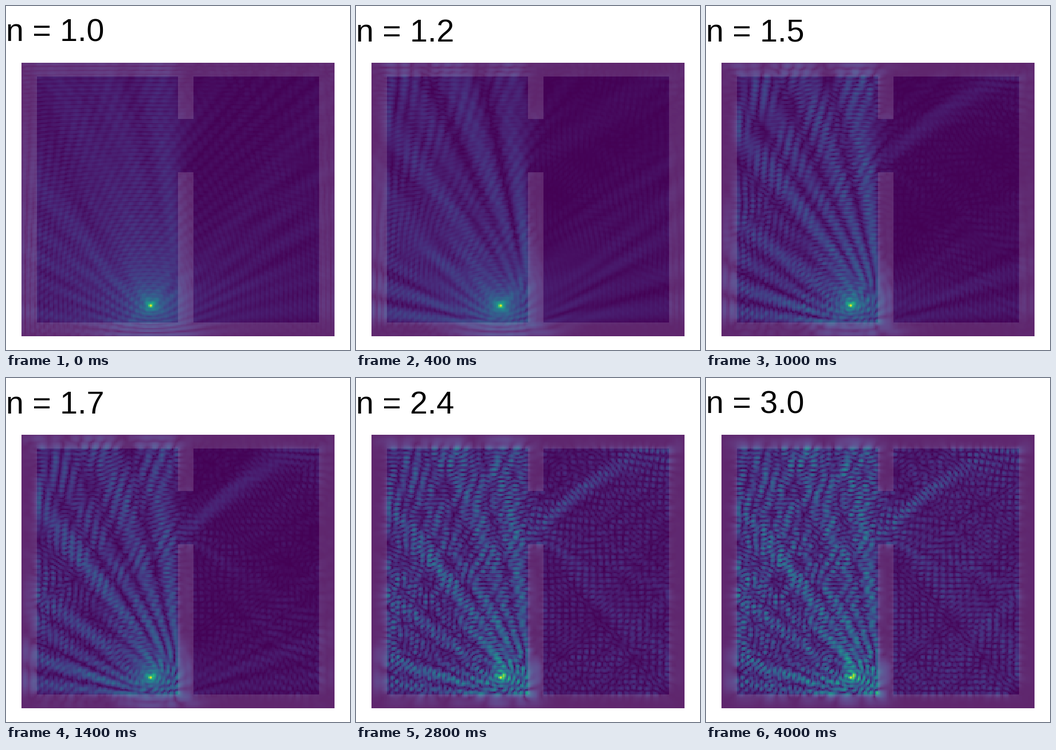
A matplotlib script for the animation above (4200 ms loop, 600 by 600 pixels).

```python
import matplotlib.pyplot as plt
import numpy as np
from matplotlib.animation import FuncAnimation
from numpy.linalg import eig, inv, solve

N = 200                      # grid cells per side
WALL = 10                    # wall thickness in cells
LEFT, RIGHT = 90, 80         # widths of the two rooms
SRC_X, SRC_Y = 82, 22
GAP = slice(120, 159)        # doorway rows in the middle wall
FRAMES, INTERVAL = 21, 200
C_AIR = 1.0                  # (wavenumber * cell size) squared
LOSS = 0.1                   # absorption inside the walls
EYE = np.eye(N)


def wall(A, R):
    """Carry the column-to-column map R back through one wall."""
    steps = []
    for _ in range(WALL):
        R = -inv(A + R)
        steps.append(R)

    def fill(u):
        cols = []
        for step in reversed(steps):
            u = step @ u
            cols.append(u)
        return np.array(cols).T

    return R, fill


def room(z, R, m):
    """Carry R back through m columns of air, using the modes z."""
    zm = z**m
    B = solve(EYE - R * z, (R - np.diag(z)) * zm)
    M = inv(EYE + (zm * z)[:, None] * B)
    j = np.arange(1, m + 1)

    def fill(u):
        a = M @ u
        b = B @ a
        zc = z[:, None]
        return zc**j * a[:, None] + zc**(m + 1 - j) * b[:, None]

    return (np.diag(z) + zm[:, None] * B) @ M, fill


def room_modes(c_wall):
    """Vertical modes of a room between floor and ceiling, by parity."""
    h = N // 2
    diag = np.full(h, C_AIR - 4, complex)
    diag[:WALL] = c_wall - 4
    half = np.diag(diag) + np.eye(h, k=1) + np.eye(h, k=-1)
    pair = np.array([half, half])
    pair[0, -1, -1] += 1
    pair[1, -1, -1] -= 1
    lam, v = eig(pair)
    V = np.block([[v[0], v[1]], [v[0][::-1], -v[1][::-1]]])
    return lam.ravel(), V


def field(n):
    """Wave amplitude when waves run n times faster in the walls (Helmholtz)."""
    c_wall = C_AIR / n**2 + 1j * LOSS
    lam, V = room_modes(c_wall)
    Vi = inv(V)
    z = (-lam + np.sqrt(lam**2 - 4)) / 2
    z = np.where(abs(z) > 1, 1 / z, z)

    solid = np.zeros(N, complex)
    solid[WALL:-WALL] = c_wall - C_AIR
    door = solid.copy()
    door[GAP] = 0
    A_outer, A_mid = (np.diag(lam) + Vi @ (d[:, None] * V) for d in (solid, door))

    R_outer, fill_outer = wall(A_outer, np.zeros((N, N)))
    R_right, fill_right = room(z, R_outer, RIGHT)
    R_mid, fill_mid = wall(A_mid, R_right)
    R_near, fill_near = room(z, R_mid, WALL + LEFT - SRC_X - 1)
    R_left, fill_left = room(z, R_outer, SRC_X - WALL)

    u = solve(np.diag(lam) + R_left + R_near, -Vi[:, SRC_Y])
    left, near = fill_left(u), fill_near(u)
    mid = fill_mid(near[:, -1])
    right = fill_right(mid[:, -1])
    modes = np.hstack([fill_outer(left[:, -1])[:, ::-1], left[:, ::-1],
                       u[:, None], near, mid, right, fill_outer(right[:, -1])])
    # Widen the point source to a cell and its four neighbours.
    wave = (5 - C_AIR) * (V @ modes)
    wave[SRC_Y, SRC_X] -= 1
    amp = abs(wave)
    return amp / amp.max()


indices = 1 + 0.1 * np.arange(FRAMES)
fields = [field(n) for n in indices]

mask = np.ones((N, N))
mask[WALL:-WALL, WALL:WALL + LEFT] = 0
mask[WALL:-WALL, -WALL - RIGHT:-WALL] = 0
mask[GAP, WALL + LEFT:-WALL - RIGHT] = 0
veil = np.ones((N, N, 4))
veil[..., 3] = 0.15 * mask

fig = plt.figure(figsize=(6, 6), dpi=100, facecolor="white")
ax = fig.add_axes([0, 0, 1, 1])
ax.axis("off")
place = dict(extent=(27.3, 572.7, 576, 99), origin="lower",
             interpolation="nearest", aspect="auto")
heat = ax.imshow(fields[0], cmap="viridis", vmin=0, vmax=1, **place)
ax.imshow(veil, **place)
ax.set(xlim=(0, 600), ylim=(600, 0))
label = ax.text(0.5, 62, "", family="Liberation Sans", fontsize=55.5 * 0.72,
                color="black", va="baseline")


def update(i):
    heat.set_data(fields[i])
    label.set_text(f"n = {indices[i]:.1f}")
    return heat, label


anim = FuncAnimation(fig, update, frames=FRAMES, interval=INTERVAL,
                     repeat=True, repeat_delay=0)
plt.show()
```
